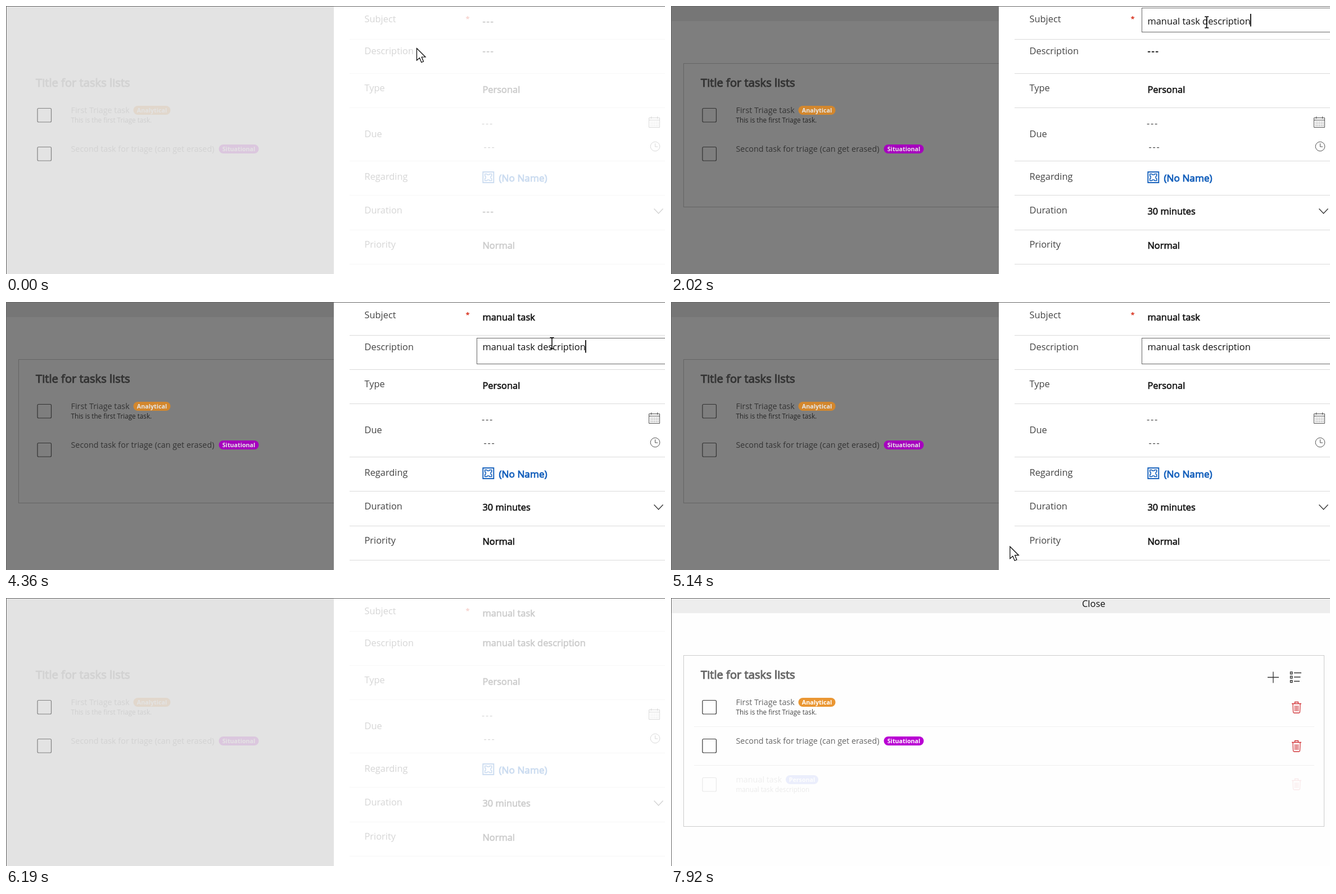
An HTML page for the animation above (8000 ms loop, 1172 px wide and 478 px high).

```html
<!DOCTYPE html>
<html lang="en">
<head>
<meta charset="utf-8">
<title>Task list</title>
<style>
  html, body { margin: 0; width: 100%; height: 100%; overflow: hidden; background: #fefefe; }
  svg { display: block; width: 100%; height: 100%; }
  text { font-family: "Open Sans", "Noto Sans", sans-serif; white-space: pre; }
  .line { fill: none; stroke: #333; stroke-width: 1.3; }
  .thin { fill: none; stroke: #505050; }
  .label { font-size: 16.4px; fill: #444; }
  .value { font-size: 16.4px; fill: #111; }
  .strong { stroke: #111; stroke-width: .6px; }
  .dashes { letter-spacing: 1.7px; }
  .muted { fill: #444; }
  .heading { font-size: 20.2px; fill: #666; stroke: #666; stroke-width: 1px; }
  .task { font-size: 14.35px; fill: #666; }
  .note { font-size: 11.7px; fill: #484848; }
  .badge { font-size: 10.7px; font-weight: 700; fill: #fff; text-anchor: middle; }
  .link { font-size: 17.2px; fill: #115ebb; stroke: #115ebb; stroke-width: .9px; }
  .trash { fill: none; stroke: #d13438; stroke-width: 1.3; }
  .field { fill: #fff; stroke: #666; }
</style>
</head>
<body>
<svg id="stage" viewBox="0 0 1172 478" preserveAspectRatio="none"></svg>
<script>
const LOOP = 8000;
const FRAME = 123.8;
const FULL = 'manual task description';
const NONE = '---';

const text = (x, y, cls, str, id = '') => `<text x="${x}" y="${y}" class="${cls}" id="${id}">${str}</text>`;
const rect = (x, y, w, h, attrs = '') => `<rect x="${x}" y="${y}" width="${w}" height="${h}" ${attrs}/>`;
const path = (d, cls, attrs = '') => `<path d="${d}" class="${cls}" ${attrs}/>`;

const checkbox = y => rect(56, y + .5, 24.5, 24.5, 'rx="2" fill="none" stroke="#333" stroke-width="1.2"');
const badge = (x, y, w, color, str) =>
  rect(x, y, w, 16, `rx="8" fill="${color}"`) + text(x + w / 2, y + 12.3, 'badge', str);
const trash = y => path(
  `M1104 ${y + 3.5}h17M1109.5 ${y + 3}v-2.5h6v2.5M1106 ${y + 4}l.6 14.5q.2 1.5 1.6 1.5h8.6q1.4 0 1.6-1.5l.6-14.5` +
  `M1109.8 ${y + 7}v10M1112.5 ${y + 7}v10M1115.2 ${y + 7}v10`, 'trash');
const separator = y => path(`M41 ${y}.5H1144`, '', 'stroke="#f0f0f0"');
const listRow = i => path(`M1101.5 ${132 + i * 7.5}h3.5v3.5h-3.5zM1108 ${133.5 + i * 7.5}h${13 - i * 1.5}`, 'line');

const page = `
  ${rect(0, 0, 1172, 478, 'fill="#fefefe"')}
  <g id="frames">
    ${rect(0, 0, 1172, 27, 'fill="#ededed"')}
    ${rect(22.5, 102.5, 1139, 256, 'id="card" fill="none" stroke="#ccc"')}
  </g>
  ${text(731, 15.5, 'value', 'Close')}
  ${text(53, 144, 'heading', 'Title for tasks lists')}
  ${path('M1061 141.5h20M1071 131.5v20', 'line')}
  ${[0, 1, 2].map(listRow).join('')}
  ${text(115.5, 191, 'task', 'First Triage task')}
  ${text(115.5, 208, 'note', 'This is the first Triage task.')}
  ${text(115.5, 260, 'task', 'Second task for triage (can get erased)')}
  <g id="separators">${separator(229)}${separator(298)}</g>
  ${trash(185)}${trash(254)}`;

const newRow = `<g id="newRow" opacity=".1">
  ${checkbox(320)}${text(115.5, 328.5, 'task', 'manual task')}
  ${badge(204, 316, 58, '#4f6bed', 'Personal')}
  ${text(115.5, 345.5, 'note', 'manual task description')}${trash(322)}</g>`;

// Label baseline and the rule line below each form row.
const rows = [['Subject', 29, 59], ['Description', 85.5, 120], ['Type', 151.5, 181], ['Due', 234, 276],
  ['Regarding', 309.5, 337], ['Duration', 369.5, 399], ['Priority', 430.5, 460]];
const formRow = ([name, baseline, rule]) =>
  path(`M611 ${rule}.5H1172`, '', 'stroke="#dadada"') + text(637.5, baseline, 'label', name);
const notch = (dx, dy) => `l${3.6 * dx} ${3.6 * dy}q${-1.6 * dy} ${1.6 * dx} ${2.4 * dx - 1.6 * dy} ${2.4 * dy + 1.6 * dx}` +
  `t${2.4 * dx + 1.6 * dy} ${2.4 * dy - 1.6 * dx}l${3.6 * dx} ${3.6 * dy}`;
const puzzle = 'M851.7 299.5' + notch(1, 0) + notch(0, 1) + notch(-1, 0) + notch(0, -1) + 'z';

const panel = `<g id="panel">
  ${rect(583, 0, 589, 478, 'fill="#fff"')}
  ${rows.map(formRow).join('')}
  <text x="817.5" y="28" font-size="13" font-weight="700" fill="#d8301c">*</text>
  ${rect(837.5, 3.5, 340, 43, 'id="subjectBox" class="field"')}
  ${rect(837.5, 64.5, 340, 46, 'id="detailBox" class="field"')}
  ${rect(837.5, 286.5, 340, 42, 'id="regardingBox" class="field"')}
  ${text(847.5, 32.5, 'value', '', 'subject')}
  ${text(847.5, 86, 'value', '', 'detail')}
  ${path('', '', 'id="caret" stroke="#000" stroke-width="1.7"')}
  ${text(847.5, 155, 'value strong', 'Personal')}
  ${text(846, 214.5, 'value dashes muted', NONE)}
  ${text(849.5, 257, 'value dashes muted', NONE)}
  ${path('M1143.5 199.5h19v17h-19zM1143.5 203.5h19M1147.5 197v4M1158.5 197v4', 'thin')}
  ${path('M1146.5 207h14M1146.5 210.3h14M1146.5 213.6h14', 'thin', 'stroke-dasharray="1.6 1.5"')}
  <circle cx="1154.5" cy="250.5" r="8.3" class="thin"/>
  ${path('M1154.5 245v6h4.5', 'thin')}
  <g fill="none" stroke="#115ebb" stroke-width="1.9">
    ${rect(848.3, 296, 19, 19)}${path(puzzle, '', 'stroke-width="1.5"')}
  </g>
  ${text(876.5, 313, 'link', '(No Name)')}
  ${text(847.5, 372, 'value strong', '', 'duration')}
  ${path('M1152.5 361.5l8 8.5 8-8.5', 'line')}
  ${text(847.5, 433, 'value strong', 'Normal')}</g>`;

document.getElementById('stage').innerHTML = `
  ${page}${newRow}
  ${rect(0, 0, 584, 478, 'id="dim" opacity=".5"')}
  <g id="badges">
    ${badge(226.5, 178, 66, '#ea9632', 'Analytical')}
    ${badge(378.5, 247, 71, '#b900d3', 'Situational')}
  </g>
  ${panel}
  ${rect(0, 0, 1172, 478, 'id="fade" fill="#fff" opacity=".78"')}
  <g id="checks">${checkbox(182)}${checkbox(251)}</g>
  ${path('M0 0V21.5L5 17 8.3 25 12 23.5 8.7 15.5H15.5Z', '', 'id="arrow" fill="#fff" stroke="#000" stroke-width="1.2"')}
  ${path('M-3.5-10H-1.5Q0-10 0-8.5Q0-10 1.5-10H3.5M0-9V9M-3.5 10H-1.5Q0 10 0 8.5Q0 10 1.5 10H3.5', '', 'id="beam" fill="none" stroke="#000" stroke-width="1.5"')}
  ${path('M0 .5H1172M.5 0V478', '', 'stroke="#666"')}`;

// Pointer waypoints: time, x, y.
const route = [[100, 730.5, 75.5], [150, 838, 70], [540, 926, 27], [1800, 932, 27], [2020, 954, 29],
  [2200, 993, 14], [2830, 988, 33], [3360, 961, 67], [4200, 961, 72], [4360, 971, 73.5],
  [4750, 1000, 290], [5140, 560, 452], [5500, 12, 396], [5700, -11, 392],
  [6850, 571, 211], [7410, 568, 194]];

const span = (t, from, to) => Math.min(1, Math.max(0, (t - from) / (to - from)));
const within = (t, from, to) => t >= from && t < to;
const $ = id => document.getElementById(id);
const show = (id, on) => $(id).setAttribute('display', on ? 'inline' : 'none');

function pointerAt(t) {
  const next = Math.max(1, route.findIndex(p => p[0] > t));
  const [a, b] = t >= route.at(-1)[0] ? route.slice(-2) : route.slice(next - 1, next + 1);
  const k = span(t, a[0], b[0]);
  return [a[1] + (b[1] - a[1]) * k, a[2] + (b[2] - a[2]) * k];
}

function fillField(id, str, editing) {
  const el = $(id);
  if (el.textContent !== str) el.textContent = str;
  el.setAttribute('class', 'value' + (editing ? '' : ' strong') + (str === NONE ? ' dashes' : ''));
}

function drawForm(t, tick) {
  const onSubject = within(t, 970, 3610);
  const onDetail = within(t, 3610, 6070);
  const subjectLength = Math.round(23 * span(tick, 1260, 1740) - 12 * span(tick, 2350, 2900));
  const detailLength = Math.round(23 * span(tick, 3860, 4100));

  show('subjectBox', within(t, 420, 3610));
  show('detailBox', within(t, 3100, 6070));
  show('regardingBox', within(t, 4750, 4900));
  fillField('subject', t < 970 ? NONE : FULL.slice(0, subjectLength), onSubject);
  fillField('detail', t < 3610 ? NONE : FULL.slice(0, detailLength), onDetail);
  fillField('duration', t < 150 ? NONE : '30 minutes', false);

  const hasCaret = (onSubject || onDetail) && Math.floor(t / 300) % 2 === 0;
  show('caret', hasCaret);
  if (hasCaret) {
    const x = 847.7 + $(onSubject ? 'subject' : 'detail').getComputedTextLength();
    $('caret').setAttribute('d', `M${x} ${onSubject ? 14 : 68}v22.5`);
  }
}

function render(t) {
  const tick = 150 + Math.floor((t - 150) / FRAME) * FRAME;
  const open = t < 6850;
  const faded = t < 150 || within(t, 6190, 7550);
  const grown = t >= 7920;

  show('panel', open);
  show('dim', open);
  show('separators', !open);
  show('frames', !faded);
  show('fade', faded);
  show('newRow', grown);
  $('card').setAttribute('height', grown ? 305 : 256);
  $('checks').setAttribute('opacity', faded ? .55 : 1);
  $('badges').style.filter = `brightness(${!open ? 1 : faded ? .5 : .9})`;
  drawForm(t, tick);

  const [x, y] = pointerAt(tick);
  const isBeam = within(t, 150, 4750);
  const present = t < 5800 || within(t, 6850, 7550);
  show('beam', present && isBeam);
  show('arrow', present && !isBeam);
  $(isBeam ? 'beam' : 'arrow').setAttribute('transform', `translate(${x} ${y})`);
}

const start = performance.now();
function play() {
  render((performance.now() - start) % LOOP);
  requestAnimationFrame(play);
}
play();
</script>
</body>
</html>
```
